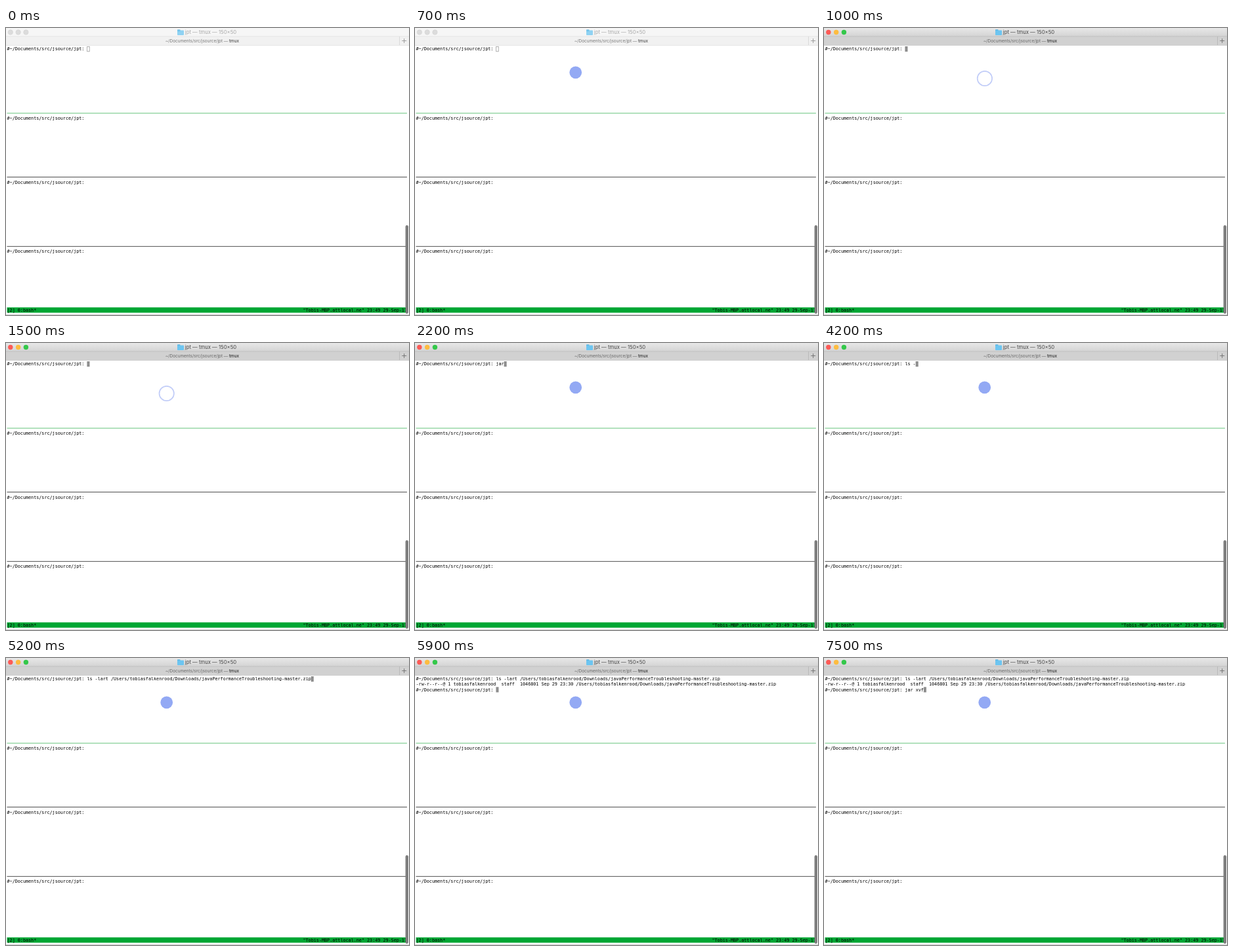
These frames come from a looping animation (614 by 438 pixels, 8000 ms). An HTML page with a canvas:

```html
<!DOCTYPE html>
<html lang="en">
<head>
<meta charset="utf-8">
<title>Terminal session</title>
<style>
  html, body { margin: 0; width: 614px; height: 438px; overflow: hidden; background: #fff; }
  canvas { display: block; }
</style>
</head>
<body>
<canvas id="stage" width="614" height="438"></canvas>
<script>
const ctx = document.getElementById('stage').getContext('2d');
const LOOP = 8000, WIDTH = 614, HEIGHT = 438;
const LEFT = 1.5, TOP = 28, CELL_W = 4.063, CELL_H = 8.13;
const MONO = '"DejaVu Sans Mono", monospace', SANS = 'Inter, sans-serif';

const user = 'tobiasfalkenrood';
const prompt = '#~/Documents/src/jsource/jpt: ';
const zip = `/Users/${user}/Downloads/javaPerformanceTroubleshooting-master.zip`;
const listCommand = prompt + 'ls -lart ' + zip;
const listing = `-rw-r--r--@ 1 ${user}  staff  1046801 Sep 29 23:30 ${zip}`;
const afterListing = [listCommand, listing];

// Each step holds until the next one; the cursor follows the last line.
const screens = [
  [0, [prompt]],
  [2200, [prompt + 'jar']],
  [3200, [prompt + 'ja']],
  [3500, [prompt + 'j']],
  [3700, [prompt]],
  [4000, [prompt + 'ls ']],
  [4200, [prompt + 'ls -']],
  [4500, [prompt + 'ls -lar']],
  [4700, [prompt + 'ls -lart ']],
  [5200, [listCommand]],
  [5700, [listCommand, '']],
  [5800, [...afterListing, prompt]],
  [6500, [...afterListing, prompt + 'jar']],
  [6700, [...afterListing, prompt + 'jar ']],
  [7000, [...afterListing, prompt + 'jar xv']],
  [7500, [...afterListing, prompt + 'jar xvf']],
];

const pointers = [
  [0, null],
  [500, { x: 257.5, y: 74 }],
  [700, { x: 244.7, y: 67.8 }],
  [1000, { x: 244.9, y: 77, ring: true }],
  [1200, { x: 244.7, y: 77 }],
  [1500, { x: 244.7, y: 77, ring: true }],
  [1700, { x: 244.7, y: 67.8 }],
];

const valueAt = (steps, t) => steps.findLast(([start]) => start <= t)[1];
const colX = col => LEFT + col * CELL_W;
const rowY = row => TOP + row * CELL_H;

function rect(x, y, w, h, color) {
  ctx.fillStyle = color;
  ctx.fillRect(x, y, w, h);
}

function roundRect(x, y, w, h, radius, color) {
  ctx.fillStyle = color;
  ctx.beginPath();
  ctx.roundRect(x, y, w, h, radius);
  ctx.fill();
}

function circle(x, y, r, fill, stroke, lineWidth = 0.5) {
  ctx.beginPath();
  ctx.arc(x, y, r, 0, 7);
  ctx.fillStyle = fill;
  ctx.fill();
  if (!stroke) return;
  ctx.strokeStyle = stroke;
  ctx.lineWidth = lineWidth;
  ctx.stroke();
}

// Text is set large and scaled down so that small sizes keep exact advances.
function text(string, x, y, size, family, color) {
  const zoom = 8;
  ctx.save();
  ctx.translate(x, y);
  ctx.scale(1 / zoom, 1 / zoom);
  ctx.font = `${size * zoom}px ${family}`;
  ctx.fillStyle = color;
  ctx.fillText(string, 0, 0);
  const width = ctx.measureText(string).width / zoom;
  ctx.restore();
  return width;
}

const print = (string, col, row) =>
  text(string, colX(col), rowY(row) + 6.3, 6.75, MONO, '#000');

function drawTitleBar(active) {
  const shade = ctx.createLinearGradient(0, 0, 0, 13);
  shade.addColorStop(0, active ? '#e8e8e8' : '#f6f6f6');
  shade.addColorStop(1, active ? '#d3d3d3' : '#f6f6f6');
  rect(0, 0, WIDTH, 13, shade);
  rect(0, 13, WIDTH, 13, active ? '#d1d1d1' : '#f1f1f1');
  rect(0, 12.6, WIDTH, 0.6, active ? '#b5b5b5' : '#dadada');
  rect(0, 26, WIDTH, 0.6, active ? '#b5b5b5' : '#d4d4d4');

  ['#fc5b57', '#fdbc40', '#34c84a'].forEach((color, i) =>
    circle(6.8 + i * 11.8, 6.5, 3.7, active ? color : '#dcdcdc', active ? null : '#cfcfcf'));

  ctx.globalAlpha = active ? 1 : 0.75;
  roundRect(261, 2.3, 4.5, 3, 0.8, '#55b3e2');
  roundRect(261, 3.4, 10, 7.6, 0.8, '#6dc5f0');
  ctx.globalAlpha = 1;
  text('jpt — tmux — 150×50', 272.8, 9.3, 7.7, SANS, active ? '#454545' : '#a9a9a9');

  const pathWidth = text('~/Documents/src/jsource/jpt — ', 243, 22, 6.4, SANS, active ? '#666' : '#777');
  text('tmux', 243 + pathWidth, 22, 6.4, SANS, active ? '#111' : '#333');

  rect(599, 13, 0.7, 13, active ? '#b0b0b0' : '#d0d0d0');
  const plus = active ? '#666' : '#8c8c8c';
  rect(603.2, 19.1, 7, 0.8, plus);
  rect(606.3, 16, 0.8, 7, plus);
}

function drawPanes() {
  [[12, '#3fb55c'], [24, '#222'], [37, '#222']].forEach(([row, color]) => {
    rect(LEFT, rowY(row + 0.5), colX(150) - LEFT, 0.8, color);
    print(prompt, 0, row + 1);
  });
  rect(LEFT, rowY(49), colX(150) - LEFT, CELL_H, '#00a633');
  print('[2] 0:bash*', 0, 49);
  print('"Tobis-MBP.attlocal.ne" 23:49 29-Sep-17', 111, 49);
  rect(0, 437.2, WIDTH, 0.8, '#c4c4c4');
  roundRect(608.6, 301, 4.4, 135, 2.2, '#7d7d7d');
}

function drawShell(lines, active) {
  lines.forEach((line, row) => print(line, 0, row));
  const row = lines.length - 1;
  const x = colX(lines[row].length), y = rowY(row);
  if (active) {
    rect(x, y, CELL_W, CELL_H, '#8e8e8e');
  } else {
    ctx.strokeStyle = '#8e8e8e';
    ctx.lineWidth = 0.7;
    ctx.strokeRect(x + 0.3, y + 0.3, CELL_W - 0.6, CELL_H - 0.6);
  }
}

function drawPointer(pointer) {
  if (!pointer) return;
  if (pointer.ring) circle(pointer.x, pointer.y, 11.2, '#fff', '#c2cdf8', 1.7);
  else circle(pointer.x, pointer.y, 9.4, '#93a9f4');
}

function draw(t) {
  const active = t >= 1000;
  rect(0, 0, WIDTH, HEIGHT, '#fff');
  drawTitleBar(active);
  drawPanes();
  drawShell(valueAt(screens, t), active);
  drawPointer(valueAt(pointers, t));
}

const start = performance.now();
function tick() {
  draw((performance.now() - start) % LOOP);
  requestAnimationFrame(tick);
}
tick();
</script>
</body>
</html>
```
